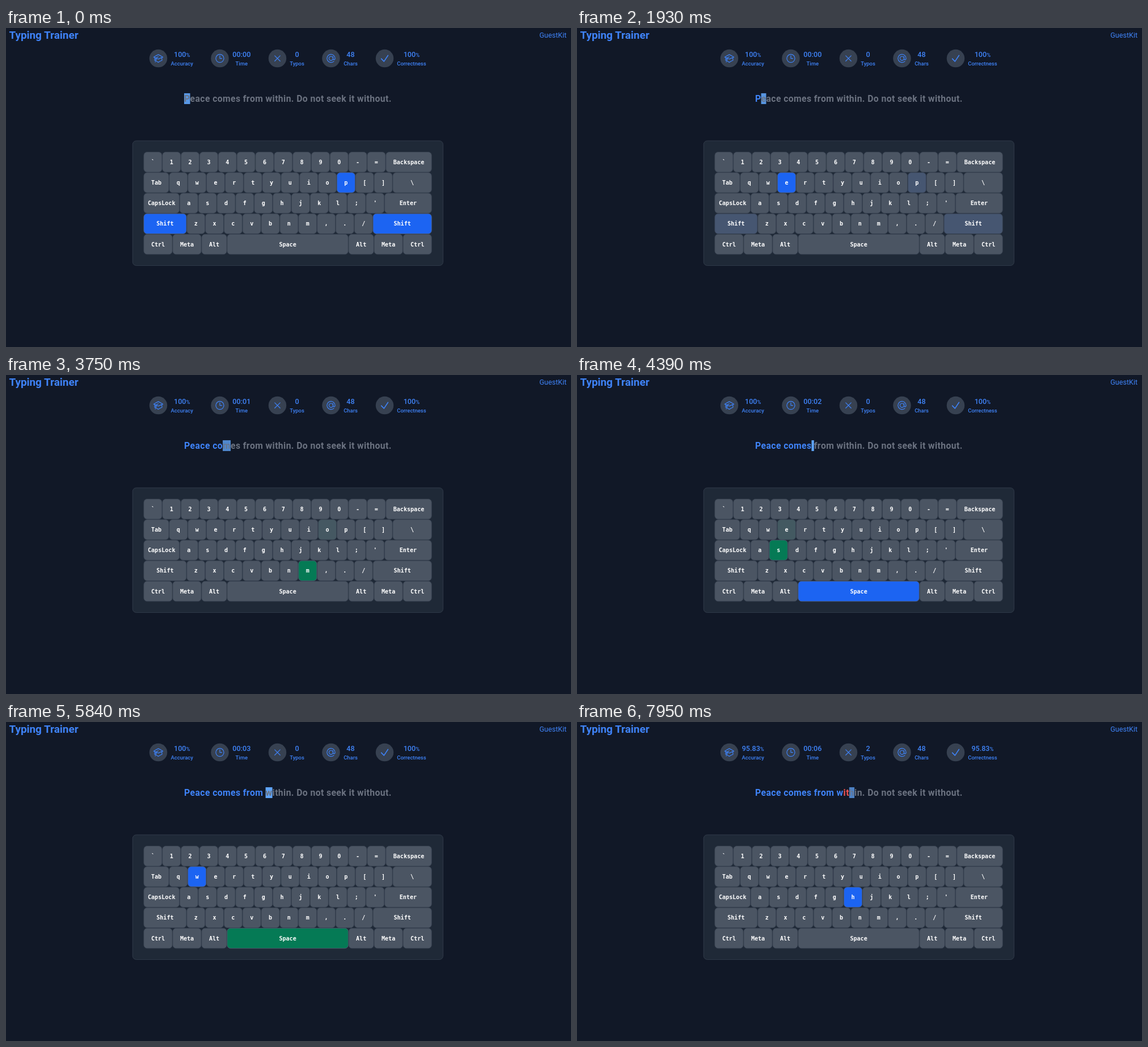
Write an HTML page that moves like this. It is 996 by 562 pixels and loops after 8000 ms.

```html
<!DOCTYPE html>
<html lang="en">
<head>
<meta charset="utf-8">
<title>Typing Trainer</title>
<style>
  html, body { margin: 0; width: 100%; height: 100%; overflow: hidden; background: #111827; }
  svg { display: block; width: 100vw; height: 100vh; }
  text { font-family: Roboto, sans-serif; fill: #3f83f8; white-space: pre; }
  .title { font-size: 24px; font-weight: 700; }
  .user, .value { font-size: 16px; }
  .value { font-weight: 500; }
  .value tspan, .label { font-size: 12px; font-weight: 500; }
  .value, .label, .cap { text-anchor: middle; }
  .line { font-size: 20px; font-weight: 700; letter-spacing: .5px; }
  .cap { font: 700 12.8px "DejaVu Sans Mono", monospace; fill: #fff; }
  .icon { fill: none; stroke: #3f83f8; stroke-width: 1.5; stroke-linecap: round; stroke-linejoin: round; }
</style>
</head>
<body>
<svg id="stage" viewBox="0 0 1265 713.8" preserveAspectRatio="none"></svg>
<script>
const LOOP = 8000, FADE = 300, PULSE = 1200;
const GRAY = [75, 85, 99], BLUE = [28, 100, 242], GREEN = [5, 122, 85];
const EDGE = [55, 65, 81], LIT_EDGE = [86, 98, 119];
const SENTENCE = "Peace comes from within. Do not seek it without.";

// moment at which the cursor moves past each typed character
const TYPED = [1740, 2230, 2450, 2650, 2860, 2935, 3230, 3480, 3790, 4130,
  4350, 4600, 4850, 5050, 5230, 5480, 5800, 6600, 7300, 7650];
const FIRST_GREEN = 6, FIRST_TYPO = 18;

const stage = document.getElementById("stage");

function add(tag, attrs, parent = stage, content = "") {
  const node = document.createElementNS("http://www.w3.org/2000/svg", tag);
  for (const name in attrs) node.setAttribute(name, attrs[name]);
  node.textContent = content;
  parent.appendChild(node);
  return node;
}

const label = (cls, x, y, content) => add("text", { class: cls, x, y }, stage, content);

// header
label("title", 7, 24, "Typing Trainer");
label("user", 1255, 21.5, "GuestKit").setAttribute("text-anchor", "end");

// statistics
const ICONS = {
  cap: "M4.26 10.147a60.4 60.4 0 0 0-.491 6.347A48.6 48.6 0 0 1 12 20.904a48.6 48.6 0 0 1 8.232-4.41 60.5 60.5 0 0 0-.491-6.347m-15.482 0a50.6 50.6 0 0 0-2.658-.813A59.9 59.9 0 0 1 12 3.493a59.9 59.9 0 0 1 10.399 5.84c-.896.248-1.783.52-2.658.814m-15.482 0A50.7 50.7 0 0 1 12 13.489a50.7 50.7 0 0 1 7.74-3.342M6.75 15a.75.75 0 1 0 0-1.5.75.75 0 0 0 0 1.5Zm0 0v-3.675A55.4 55.4 0 0 1 12 8.443m-7.007 11.55A6 6 0 0 0 6.75 15.75v-1.5",
  clock: "M12 6v6h4.5m4.5 0a9 9 0 1 1-18 0 9 9 0 0 1 18 0Z",
  cross: "M6 18 18 6M6 6l12 12",
  at: "M16.5 12a4.5 4.5 0 1 1-9 0 4.5 4.5 0 0 1 9 0Zm0 0c0 1.657 1.007 3 2.25 3S21 13.657 21 12a9 9 0 1 0-2.636 6.364M16.5 12V8.25",
  check: "m4.5 12.75 6 6 9-13.5"
};

function stat(icon, name, cx, tx) {
  add("circle", { cx, cy: 68, r: 20, fill: "#374151" });
  const path = add("path", { class: "icon", d: ICONS[icon], transform: `translate(${cx - 12} 56)` });
  if (icon === "check") path.style.strokeWidth = 2;
  label("label", tx, 83.8, name);
  const node = label("value", tx, 65.3, "");
  const main = document.createTextNode("");
  node.appendChild(main);
  const unit = add("tspan", {}, node);
  return (value, suffix = "") => {
    main.data = value;
    unit.textContent = suffix;
  };
}

const setAccuracy = stat("cap", "Accuracy", 341, 394);
const setTime = stat("clock", "Time", 478.8, 527.5);
const setTypos = stat("cross", "Typos", 607.7, 651.6);
const setChars = stat("at", "Chars", 727.7, 771.6);
const setCorrect = stat("check", "Correctness", 847.8, 908);
setChars(SENTENCE.length);

// sentence
const cursor = add("rect", { y: 146, height: 24.2, fill: "#60a5fa" });
const line = label("line", 398.8, 164.8, "");
const letters = [...SENTENCE].map(c => add("tspan", {}, line, c));

// keyboard
const CHAR = 7.7, PAD = 34, LEFT = 308, RIGHT = 953.4, TOP = 277, ROW = 46;
const ROWS = [
  "` 1 2 3 4 5 6 7 8 9 0 - = Backspace",
  "Tab q w e r t y u i o p [ ] \\",
  "CapsLock a s d f g h j k l ; ' Enter",
  "Shift z x c v b n m , . / Shift",
  "Ctrl Meta Alt Space Alt Meta Ctrl"
];
const WIDE = { CapsLock: 80.6, Shift: 96.3, Space: 272 };
const keys = [];

add("rect", { x: 283.5, y: 252.5, width: 695, height: 279, rx: 8, fill: "#1f2937", stroke: "#374151" });
ROWS.forEach((row, r) => {
  const names = row.split(" ");
  let x = LEFT;
  names.forEach((name, i) => {
    const last = i === names.length - 1;
    const w = last ? RIGHT - x : WIDE[name] || name.length * CHAR + PAD;
    const y = TOP + r * ROW;
    const box = add("rect", { x: x + .5, y: y + .5, width: w - 1, height: ROW - 1, rx: 7.5 });
    label("cap", x + w / 2, y + 27.4, name);
    keys.push({ name, box });
    x += w;
  });
});

function keysFor(c) {
  if (c === " ") return ["Space"];
  return c === c.toLowerCase() ? [c] : [c.toLowerCase(), "Shift"];
}
const uses = [...SENTENCE].map(keysFor);

// cubic-bezier(.4, 0, .2, 1)
function ease(p) {
  if (p <= 0 || p >= 1) return p <= 0 ? 0 : 1;
  let lo = 0, hi = 1, s = p;
  for (let i = 0; i < 16; i++) {
    s = (lo + hi) / 2;
    const x = 1.2 * s * (1 - s) ** 2 + .6 * s * s * (1 - s) + s ** 3;
    if (x < p) lo = s; else hi = s;
  }
  return s * s * (3 - 2 * s);
}

const mix = (a, b, p) => a.map((v, i) => Math.round(v + (b[i] - v) * p));
const rgb = c => `rgb(${c})`;

// colour a key is lit with and how much of it remains
function glow(name, t) {
  let color = BLUE, left = 0;
  for (let i = 0; i <= TYPED.length; i++) {
    if (!uses[i].includes(name)) continue;
    const start = i ? TYPED[i - 1] : 0;
    const end = i < TYPED.length ? TYPED[i] : LOOP;
    if (t < start) break;
    const green = i >= FIRST_GREEN && i < FIRST_TYPO;
    color = green && t >= end - 50 ? GREEN : BLUE;
    left = 1 - ease((t - end - (green ? 75 : 0)) / FADE);
  }
  return [color, left];
}

function letterColor(i, count) {
  if (i >= count) return "#6b7280";
  return i < FIRST_TYPO ? "#3f83f8" : "#f05252";
}

function draw(t) {
  const count = TYPED.filter(at => at <= t).length;
  const typos = Math.max(0, count - FIRST_TYPO);
  const share = typos ? (100 - typos * 100 / SENTENCE.length).toFixed(2) : "100";
  setAccuracy(share, "%");
  setCorrect(share, "%");
  setTypos(typos);
  setTime("00:0" + Math.max(0, Math.floor((t - 1865) / 1010)));

  const since = t - (count ? TYPED[count - 1] : 165);
  const opacity = .75 + .25 * Math.cos(since / PULSE * 2 * Math.PI);
  letters.forEach((node, i) => {
    node.setAttribute("fill", letterColor(i, count));
    node.style.fill = letterColor(i, count);
    node.style.fillOpacity = i === count ? opacity : 1;
  });
  const x = line.getStartPositionOfChar(count).x;
  cursor.setAttribute("x", x);
  cursor.setAttribute("width", line.getStartPositionOfChar(count + 1).x - x);
  cursor.setAttribute("opacity", opacity);

  for (const { name, box } of keys) {
    const [color, left] = glow(name, t);
    box.setAttribute("fill", rgb(mix(GRAY, color, left)));
    box.setAttribute("stroke", rgb(mix(EDGE, LIT_EDGE, left)));
  }
}

const begin = performance.now();
function tick() {
  draw((performance.now() - begin) % LOOP);
  requestAnimationFrame(tick);
}
tick();
</script>
</body>
</html>
```
